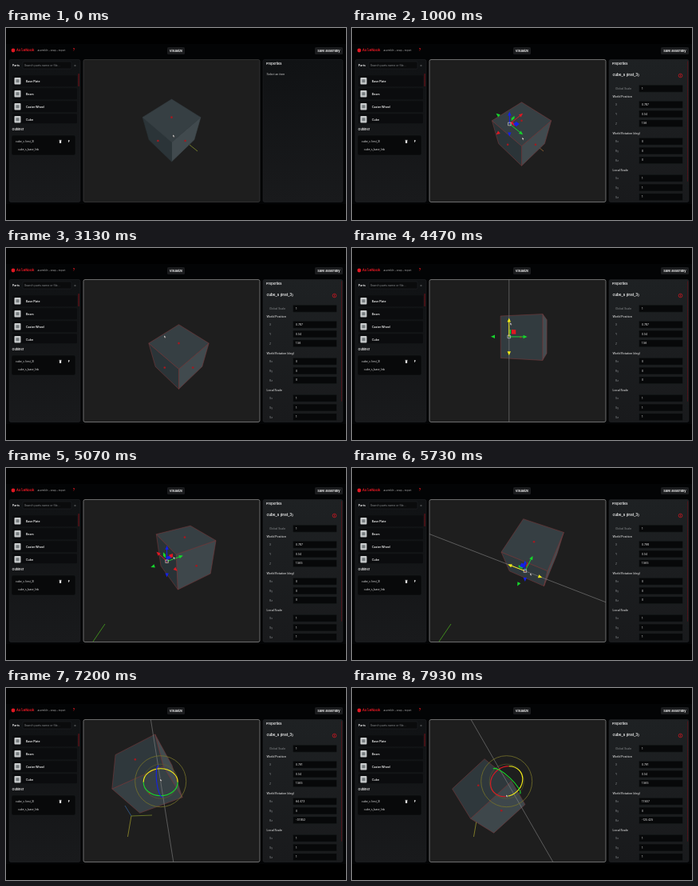
These frames come from a looping animation (426x240 px, 8000 ms). An HTML page with a canvas:

```html
<!DOCTYPE html>
<html lang="en">
<head>
<meta charset="utf-8">
<title>Assembly editor</title>
<style>
html, body { margin: 0; width: 100%; height: 100%; overflow: hidden; background: #000; }
canvas { display: block; width: 100vw; height: 100vh; }
</style>
</head>
<body>
<canvas id="stage"></canvas>
<script>
const W = 426, H = 240, LOOP = 8000, EYE = 6.3;
const canvas = document.getElementById('stage');
const ctx = canvas.getContext('2d');
const RED = '#e01822', GREEN = '#16d52c', BLUE = '#1420e8', YELLOW = '#f5ee16';
const AXES = [[0, 1, 0], [1, 0, 0], [0, 0, 1]];

// Each view holds from its start to its end time, then eases into the next.
const VIEWS = [
  { start: 0,    end: 650,  x: 207.5, y: 127.5, size: 22.5, yaw: 45,  pitch: 52, roll: 0 },
  { start: 1300, end: 3130, x: 216.5, y: 135.5, size: 23.3, yaw: 45,  pitch: 52, roll: 0 },
  { start: 4250, end: 4600, x: 218.4, y: 111,   size: 23.3, yaw: 15,  pitch: 1,  roll: 0 },
  { start: 5450, end: 5850, x: 228,   y: 107,   size: 25.5, yaw: -66, pitch: 60, roll: 0 },
  { start: 6650, end: 6800, x: 179,   y: 97,    size: 30,   yaw: -61, pitch: 37, roll: -35 },
  { start: 7900, end: LOOP, x: 172,   y: 136,   size: 27,   yaw: -88, pitch: 50, roll: -44 }
];
const CURSOR = [[0, 209, 133], [1600, 215, 138], [3130, 198, 109], [4470, 198, 93],
  [5730, 223, 131], [6730, 193, 103], [7930, 193, 133]]
  .map(([start, x, y]) => ({ start, end: start, x, y }));

const between = (t, a, b) => t >= a && t < b;
function ramp(t, a, b) {
  const u = Math.min(1, Math.max(0, (t - a) / (b - a)));
  return u * u * (3 - 2 * u);
}
function track(keys, t) {
  const i = keys.findLastIndex(key => key.start <= t);
  const a = keys[i], b = keys[i + 1] || a;
  const u = a === b ? 0 : ramp(t, a.end, b.start);
  return Object.fromEntries(Object.keys(a).map(k => [k, a[k] + (b[k] - a[k]) * u]));
}

// Turns a model vector into screen x, screen y and depth towards the eye.
function rotate(view, [a, b, c]) {
  const [yaw, pitch, roll] = [view.yaw, view.pitch, view.roll].map(d => d * Math.PI / 180);
  const x = a * Math.cos(yaw) + b * Math.sin(yaw);
  const h = a * Math.sin(yaw) - b * Math.cos(yaw);
  const y = h * Math.sin(pitch) - c * Math.cos(pitch);
  return [x * Math.cos(roll) - y * Math.sin(roll), x * Math.sin(roll) + y * Math.cos(roll),
    h * Math.cos(pitch) + c * Math.sin(pitch)];
}
function project(view, point) {
  const [x, y, depth] = rotate(view, point);
  const k = view.size * EYE / (EYE - depth);
  return [view.x + x * k, view.y + y * k];
}

function text(s, x, y, size, color = '#e4e4e4', weight = 400, family = 'Inter, sans-serif', align = 'left') {
  ctx.font = `${weight} ${size}px ${family}`;
  ctx.fillStyle = color;
  ctx.textAlign = align;
  ctx.fillText(s, x, y);
}
function box(x, y, w, h, r, fill, stroke, width = .5) {
  ctx.beginPath();
  ctx.roundRect(x, y, w, h, r);
  if (fill) { ctx.fillStyle = fill; ctx.fill(); }
  if (stroke) { ctx.strokeStyle = stroke; ctx.lineWidth = width; ctx.stroke(); }
}
function line(x1, y1, x2, y2, color, width = .8) {
  ctx.beginPath();
  ctx.moveTo(x1, y1);
  ctx.lineTo(x2, y2);
  ctx.strokeStyle = color;
  ctx.lineWidth = width;
  ctx.stroke();
}
function arc(x, y, rx, ry, turn, from, to, color, width = 1.1) {
  ctx.beginPath();
  ctx.ellipse(x, y, rx, ry, turn, from, to);
  ctx.strokeStyle = color;
  ctx.lineWidth = width;
  ctx.stroke();
}
function disc(x, y, r, color) {
  ctx.beginPath();
  ctx.arc(x, y, r, 0, 7);
  ctx.fillStyle = color;
  ctx.fill();
}
function polygon(points, fill, stroke) {
  ctx.beginPath();
  points.forEach(p => ctx.lineTo(...p));
  ctx.closePath();
  ctx.fillStyle = fill;
  ctx.fill();
  if (stroke) { ctx.strokeStyle = stroke; ctx.lineWidth = .6; ctx.stroke(); }
}
function panel(x, w, top) {
  const shade = ctx.createLinearGradient(0, 39, 0, 217);
  shade.addColorStop(0, top);
  shade.addColorStop(1, '#191a1c');
  box(x, 39.5, w, 178, 2, shade, '#24272a');
}

function drawHeader() {
  disc(9, 28, 2.4, RED);
  text('AxleNook', 13, 28.2, 4.7, RED, 700, '"DejaVu Sans Mono", monospace');
  text('assemble • snap • export', 39.5, 28.3, 2.9, '#aaa');
  text('?', 85, 28, 4.5, RED, 700, undefined, 'center');
  box(202, 24, 22, 9, 1.5, '#1b1c1e');
  text('Visualize', 213, 28.6, 3.8, '#fff', 600, undefined, 'center');
  box(387, 24, 35, 9, 1.5, '#1b1c1e');
  text('Save assembly', 404.3, 28.6, 3.9, '#fff', 600, undefined, 'center');
}

function drawParts() {
  panel(4, 89, '#101214');
  text('Parts', 8, 46.7, 3.6, '#f2f2f2', 600);
  box(21, 42, 61, 9, 1.5, '#0a0b0c', '#22262a');
  text('Search parts name or file...', 23, 46.5, 3.5, '#8a8d90');
  text('×', 86.5, 46.5, 4.5, '#8a8d90', 400, undefined, 'center');
  ['Base Plate', 'Beam', 'Caster Wheel', 'Cube'].forEach((name, i) => {
    const y = 66.3 + i * 16;
    box(8, y - 7, 81, i === 3 ? 12 : 14, 1.5, '#0b0c0e');
    box(10.5, y - 4.2, 8, 8.4, .8, '#c9cccd');
    box(12.5, y - 2, 4, 4, .5, '#777d80');
    text(name, 25, y + .3, 3.5, '#eee', 600);
  });
  box(90.6, 57, 1, 16, .5, '#7b1118');
  text('Outliner', 7.5, 127, 3.8, '#f2f2f2', 600);
  box(7, 134, 80, 25, 2, '#08090a', '#191c1f');
  text('cube_s (inst_3)', 12, 142.3, 3.3);
  box(67, 140.6, 2.2, 3.4, .4, '#eee');
  box(66.5, 139.9, 3.2, .6, 0, '#eee');
  text('F', 78.8, 142.2, 4, '#eee', 700, undefined, 'center');
  text('cube_s_base_link', 15, 152.3, 3.2);
}

function fieldGroup(title, y, fields) {
  text(title, 326.5, y, 3.5, '#ddd', 500);
  Object.entries(fields).forEach(([label, value], i) => field(label, value, y + 9.8 + i * 11.7));
}
function field(label, value, y) {
  text(label, 330, y, 3.4, '#888c8f');
  box(359.5, y - 4.8, 55, 9, 1.2, '#070809', '#1c2023');
  text(String(+value.toFixed(3)), 363, y - .2, 3.4, '#eee');
}

function drawProperties(t, selected) {
  panel(322, 100, selected ? '#1e2123' : '#101214');
  text('Properties', 326, 45.3, 3.9, '#f2f2f2', 600);
  if (!selected) {
    text('Select an item', 326.5, 57.7, 3.4, '#ccc');
    return;
  }
  text('cube_s (inst_3)', 326.5, 58.7, 4.6, '#f4f4f4', 600);
  arc(411.5, 59.5, 2.3, 2.3, 0, 0, 7, RED, .7);
  line(411.5, 58.2, 411.5, 60.8, RED, .7);
  const turn = ramp(t, 6800, 7900);
  field('Global Scale', 1, 76);
  fieldGroup('World Position', 86.3, {
    X: .787 + .011 * ramp(t, 5000, 5700) - .007 * ramp(t, 5750, 6050),
    Y: .54,
    Z: 1.56 + .005 * ramp(t, 4600, 5000)
  });
  fieldGroup('World Rotation (deg)', 132.3, {
    Rx: 84.73 * ramp(t, 6200, 6700) - 67.123 * turn, Ry: 0, Rz: -125.425 * turn
  });
  fieldGroup('Local Scale', 178.3, { Sx: 1, Sy: 1, Sz: 1 });
  box(420, 41, .9, 151, .4, '#54131a');
}

function drawWorldAxes(t) {
  if (t < 3300) line(230, 146, 240, 154, t < 1000 ? '#83902c' : '#9b6834');
  if (between(t, 5000, 6100)) line(109, 217, 124, 195, '#48a51e');
  if (t >= 6250) {
    line(157, 160, 149, 147, '#315e91');
    line(157, 160, 183, 159, '#78872a');
    line(157, 160, 152.5, 186, '#96912b');
  }
}

function drawFace(view, axis, side, selected) {
  const at = (u, v) => {
    const p = [];
    p[axis] = side;
    p[(axis + 1) % 3] = u;
    p[(axis + 2) % 3] = v;
    return p;
  };
  const [nx, , depth] = rotate(view, at(0, 0));
  if (depth * EYE <= 1) return;
  const g = 62 + 15 * nx;
  const color = `rgb(${g - 8}, ${g + 1}, ${g + 5})`;
  const corners = [at(-1, -1), at(1, -1), at(1, 1), at(-1, 1)].map(p => project(view, p));
  polygon(corners, color, selected ? '#783a3c' : color);
  if (depth > .4) disc(...project(view, at(0, 0)), 1.3, '#a5191f');
}

function guide(x, y, dx, dy) {
  const k = 400 / Math.hypot(dx, dy);
  line(x - dx * k, y - dy * k, x + dx * k, y + dy * k, '#858585', .6);
}

function arrowHead(x, y, dx, dy, color) {
  const n = Math.hypot(dx, dy), ux = dx / n, uy = dy / n;
  polygon([[x + ux * 3, y + uy * 3], [x - ux * 2 - uy * 2.2, y - uy * 2 + ux * 2.2],
    [x - ux * 2 + uy * 2.2, y - uy * 2 - ux * 2.2]], color);
}

// Sits on the connection point in the middle of one cube face.
function drawMoveGizmo(t, view) {
  const [x, y] = project(view, [-1, 0, 0]);
  const axes = AXES.map(axis => rotate(view, axis).map(v => v * 22));
  const active = between(t, 1200, 2400) ? 1 : between(t, 4100, 5000) ? 2 : between(t, 5200, 6100) ? 0 : -1;
  if (active >= 0) guide(x, y, ...axes[active]);
  const colors = [RED, GREEN, BLUE];
  colors.forEach((color, i) => {
    const a = axes[(i + 1) % 3], b = axes[(i + 2) % 3];
    const at = (m, n) => [x + a[0] * m + b[0] * n, y + a[1] * m + b[1] * n];
    polygon([at(.15, .15), at(.4, .15), at(.4, .4), at(.15, .4)], color);
  });
  axes.forEach(([dx, dy], i) => {
    if (Math.hypot(dx, dy) < 8) return;
    const color = i === active ? YELLOW : colors[i];
    line(x, y, x + dx, y + dy, color, 1);
    arrowHead(x + dx * .93, y + dy * .93, dx, dy, color);
    arrowHead(x - dx * .93, y - dy * .93, -dx, -dy, color);
  });
  box(x - 1.8, y - 1.8, 3.6, 3.6, 0, null, '#ddd', .6);
}

function drawRotateGizmo(t) {
  const x = 193.7, y = 116.7, PI = Math.PI;
  const angle = PI / 2 - PI / 6 * ramp(t, 6800, 7900);
  guide(x, y, Math.cos(angle), Math.sin(angle));
  arc(x, y, 32, 32, 0, 0, 2 * PI, '#77732a', .8);
  arc(x, y, 21.5, 21.5, 0, 0, 2 * PI, '#62602c', .6);
  if (t < 7300) {
    arc(x, y + 1, 21.5, 17, 0, PI, 2 * PI, YELLOW);
    arc(x, y + 1, 21.5, 17, 0, 0, PI, GREEN);
    arc(x, y, 20, 5, 1.45, 0, PI, BLUE);
  } else {
    arc(x, y, 21, 18, -.6, -.9, 2.1, YELLOW);
    arc(x, y, 21, 18, -.6, 2.1, 5.38, RED);
    arc(x, y, 23, 6, .75, PI, 2 * PI, GREEN);
  }
}

function drawCursor(t) {
  const { x, y } = track(CURSOR, t);
  polygon([[0, 0], [0, 3.6], [.9, 2.8], [1.6, 4], [2.2, 3.7], [1.6, 2.5], [2.8, 2.4]]
    .map(([dx, dy]) => [x + dx, y + dy]), '#fff', '#333');
}

function drawViewport(t, selected) {
  const view = track(VIEWS, t);
  box(97, 39.5, 221, 178, 2, '#1e1e1e');
  ctx.save();
  ctx.clip();
  drawWorldAxes(t);
  for (const axis of [0, 1, 2]) for (const side of [-1, 1]) drawFace(view, axis, side, selected);
  if (between(t, 900, 2500) || between(t, 3600, 6150)) drawMoveGizmo(t, view);
  if (t >= 6200) drawRotateGizmo(t);
  drawCursor(t);
  ctx.restore();
  box(97, 39.5, 221, 178, 2, null, selected ? '#858585' : '#383838', .8);
}

function frame(now) {
  const t = now % LOOP, selected = t >= 650;
  const ratio = window.devicePixelRatio || 1;
  const w = Math.round(innerWidth * ratio), h = Math.round(innerHeight * ratio);
  if (canvas.width !== w || canvas.height !== h) { canvas.width = w; canvas.height = h; }
  ctx.setTransform(w / W, 0, 0, h / H, 0, 0);
  ctx.textBaseline = 'middle';
  ctx.fillStyle = '#000';
  ctx.fillRect(0, 0, W, H);
  ctx.fillStyle = '#030405';
  ctx.fillRect(0, 20, W, 200);
  drawHeader();
  drawParts();
  drawProperties(t, selected);
  drawViewport(t, selected);
  requestAnimationFrame(frame);
}
requestAnimationFrame(frame);
</script>
</body>
</html>
```
